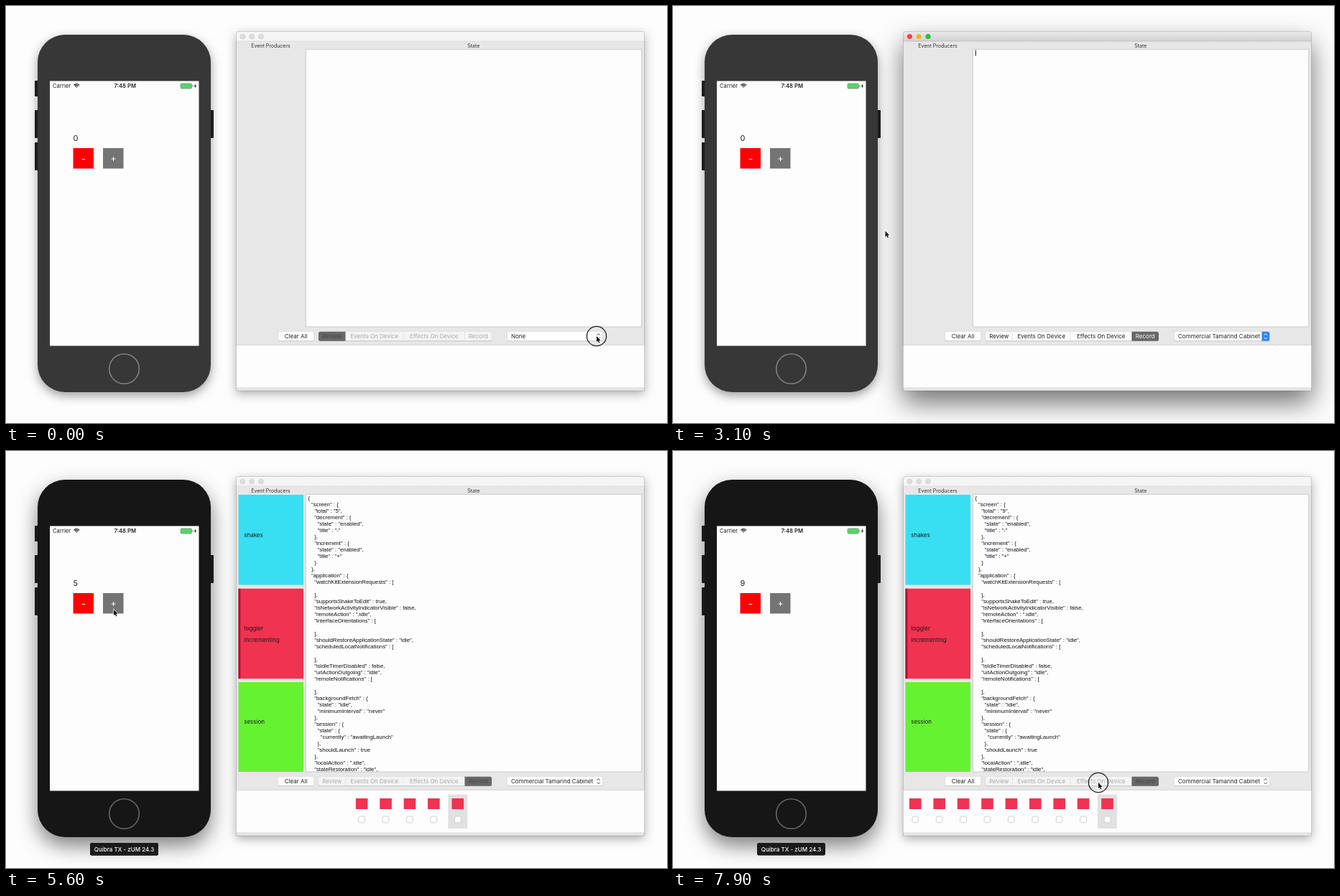
Write an HTML page with a canvas that moves like this. It is 920 px wide and 581 px high and loops after 8 s.

```html
<!DOCTYPE html>
<html lang="en">
<head>
<meta charset="utf-8">
<style>
html, body { margin: 0; width: 920px; height: 581px; overflow: hidden; background: #fdfdfd; }
canvas { display: block; }
</style>
</head>
<body>
<canvas id="stage" width="920" height="581"></canvas>
<script>
const c = document.getElementById('stage').getContext('2d');
const LOOP = 8000;
const UI = 'Inter, Roboto, sans-serif';
const CODE = '7.75px "Liberation Sans", Arial, sans-serif';
const DEVICE = 'Commercial Tamarind Cabinet';
const RED = '#ef3350';

// Times of each counted tap, and [from, to] spans when the button is held
const taps = [4310, 4640, 4950, 5270, 5560, 5740, 5920, 6100, 6250];
const presses = [[0, 190], [950, 1080], [2180, 2380], [3800, 3960], [7780, LOOP],
  [4130, 4290], ...taps.slice(1).map(t => [t - 85, t - 5])];
// Pointer stops: time, x, y
const route = [[0, 822, 460], [250, 822, 460], [600, 815, 467], [1200, 815, 467],
  [1950, 657, 467], [2800, 657, 467], [3100, 295.5, 313.5], [3650, 150, 221],
  [6700, 150, 221], [7600, 592, 462], [LOOP, 592, 462]];

const stateText = total => `{
  "screen" : {
    "total" : "${total}",
    "decrement" : {
      "state" : "enabled",
      "title" : "-"
    },
    "increment" : {
      "state" : "enabled",
      "title" : "+"
    }
  },
  "application" : {
    "watchKitExtensionRequests" : [

    ],
    "supportsShakeToEdit" : true,
    "isNetworkActivityIndicatorVisible" : false,
    "remoteAction" : ".idle",
    "interfaceOrientations" : [

    ],
    "shouldRestoreApplicationState" : "idle",
    "scheduledLocalNotifications" : [

    ],
    "isIdleTimerDisabled" : false,
    "urlActionOutgoing" : "idle",
    "remoteNotifications" : [

    ],
    "backgroundFetch" : {
      "state" : "idle",
      "minimumInterval" : "never"
    },
    "session" : {
      "state" : {
        "currently" : "awaitingLaunch"
      },
      "shouldLaunch" : true
    },
    "localAction" : ".idle",
    "stateRestoration" : "idle",`.split('\n');

function box(x, y, w, h, fill, r = 0, stroke) {
  c.beginPath();
  c.roundRect(x, y, w, h, r);
  if (fill) { c.fillStyle = fill; c.fill(); }
  if (stroke) { c.strokeStyle = stroke; c.lineWidth = 1; c.stroke(); }
}

function circle(x, y, r, fill, stroke, width = 1) {
  c.beginPath();
  c.arc(x, y, r, 0, 7);
  if (fill) { c.fillStyle = fill; c.fill(); }
  if (stroke) { c.strokeStyle = stroke; c.lineWidth = width; c.stroke(); }
}

function line(x1, y1, x2, y2, color, width = 1) {
  c.beginPath();
  c.moveTo(x1, y1);
  c.lineTo(x2, y2);
  c.strokeStyle = color;
  c.lineWidth = width;
  c.stroke();
}

function shape(points, fill, stroke) {
  c.beginPath();
  points.forEach(([x, y]) => c.lineTo(x, y));
  c.closePath();
  if (stroke) { c.strokeStyle = stroke; c.lineWidth = 1.4; c.stroke(); }
  c.fillStyle = fill;
  c.fill();
}

function text(s, x, y, { size = 8, color = '#222', align = 'left', weight = 400, font } = {}) {
  c.font = font || `${weight} ${size}px ${UI}`;
  c.textAlign = align;
  c.textBaseline = 'alphabetic';
  c.fillStyle = color;
  c.fillText(s, x, y + size * 0.36);
}

function shadowed(blur, dy, alpha, draw) {
  c.save();
  c.shadowColor = `rgba(0,0,0,${alpha})`;
  c.shadowBlur = blur;
  c.shadowOffsetY = dy;
  draw();
  c.restore();
}

function chevrons(x, y, color) {
  c.strokeStyle = color;
  c.lineWidth = 1;
  c.beginPath();
  for (const d of [-1, 1]) {
    c.moveTo(x - 2.2, y + d * 1.5);
    c.lineTo(x, y + d * 3.7);
    c.lineTo(x + 2.2, y + d * 1.5);
  }
  c.stroke();
}

function phone(active, hovered, total) {
  const body = active ? '#161616' : '#373737';
  for (const [y, h] of [[104, 22], [145, 39], [190, 39]]) box(40, y, 6, h, '#222', 1);
  box(283, 145, 6, 39, '#222', 1);
  shadowed(active ? 28 : 14, active ? 12 : 5, active ? 0.5 : 0.38,
    () => box(44, 40, 241, 498, body, 38));
  box(61, 104.5, 207.5, 369, '#fdfdfd');
  circle(164.5, 505.5, 20.8, null, active ? '#666' : '#808080', 1.6);

  text('Carrier', 65, 111.5, { size: 7.7 });
  text('7:48 PM', 165.7, 111.5, { size: 7.7, align: 'center', weight: 600 });
  c.strokeStyle = '#222';
  c.lineWidth = 1.2;
  for (const r of [1.2, 3.3, 5.4]) {
    c.beginPath();
    c.arc(98.3, 114, r, -Math.PI * 0.76, -Math.PI * 0.24);
    c.stroke();
  }
  box(243, 108, 15.5, 7, '#4cd964', 1.5, '#8d9a8f');
  box(259.5, 110, 1, 3, '#8d9a8f');
  shape([[264.2, 108], [261.8, 112], [263.2, 112], [262.6, 115], [265, 111], [263.6, 111]], '#222');

  text(total, 93.6, 184, { size: 11 });
  box(93.5, 198, 28.5, 28.5, '#fe0000');
  box(135, 198, 28.5, 28.5, '#747474');
  line(105.7, 213.5, 110.3, 213.5, '#fff');
  line(146.6, 213, 152.4, 213, '#fff');
  line(149.5, 210, 149.5, 216, '#fff');

  if (hovered) {
    box(117, 546, 95, 17.5, '#1a1a1a', 2.5);
    text('Quibra TX - zUM 24.3', 164.5, 555, { color: '#fff', align: 'center', weight: 500 });
  }
}

function toolbar(active, mode, device) {
  shadowed(1, 0.6, 0.3, () => {
    box(379, 454, 49.5, 12.5, '#fff', 2.5);
    box(435, 454, 241, 12.5, active ? '#fbfbfb' : '#f4f4f4', 2.5);
    box(698, 454, 132, 12.5, '#fff', 2.5);
  });
  text('Clear All', 403.5, 460.3, { align: 'center' });
  [['Review', 435, 472.5], ['Events On Device', 472.5, 553], ['Effects On Device', 553, 638.5],
    ['Record', 638.5, 676]].forEach(([name, from, to], i) => {
    const on = i === mode;
    if (on) box(from, 453.7, to - from, 13, '#676767', i ? [0, 2.5, 2.5, 0] : [2.5, 0, 0, 2.5]);
    else if (i < 3) line(to, 454, to, 466.5, '#dedede', 0.7);
    const color = on ? (active ? '#fff' : '#484848') : (active ? '#222' : '#a9a9a9');
    text(name, (from + to) / 2, 460.3, { align: 'center', color });
  });
  text(device, 703, 460.3);
  if (active) box(819.5, 453.7, 10.8, 13, '#2f86f6', [0, 2.5, 2.5, 0]);
  chevrons(824.7, 460.2, active ? '#fff' : '#444');
}

function panel(y, color, labels, labelY) {
  box(323.5, y, 90.5, 125.5, color);
  labels.forEach((s, i) => text(s, 331.2, labelY + i * 16.5, { color: '#1c1c1c' }));
}

function timeline(t, total) {
  const age = t - taps[total - 1];
  const last = 604.5 + 33.4 * Math.max(0, 1 - age / 150) * (total > 1);
  for (let i = 0; i < total; i++) {
    const x = last - 33.4 * (total - 1 - i);
    const selected = i === total - 1;
    if (selected) box(x - 13.5, 478.5, 27, 47.5, '#e1e1e1');
    box(x - 8.3, 484, 16.6, 15, RED);
    box(x - 4.4, 509, 8.8, 8.8, '#fff', 2, '#cfcfcf');
  }
}

function desktopWindow(t, active, mode, device, total) {
  shadowed(active ? 36 : 14, active ? 17 : 4, active ? 0.55 : 0.33,
    () => box(320.5, 35.5, 568, 500.5, '#e7e7e7', [3, 3, 0, 0]));
  const bar = c.createLinearGradient(0, 36, 0, 49);
  bar.addColorStop(0, active ? '#e9e9e9' : '#f6f6f6');
  bar.addColorStop(1, active ? '#d2d2d2' : '#f4f4f4');
  box(320.5, 35.5, 568, 13.5, bar, [3, 3, 0, 0]);
  line(320.5, 49, 888.5, 49, active ? '#bcbcbc' : '#dadada', 0.8);
  const lights = active ? ['#fc4148', '#fdb124', '#28c231'] : Array(3).fill('#dcdcdc');
  lights.forEach((fill, i) => circle(329.4 + 12.8 * i, 42.5, 3.6, fill, active ? null : '#cfcfcf', 0.6));

  const head = { size: 7, color: '#333', align: 'center' };
  text('Event Producers', 368.5, 55.5, head);
  text('State', 650.8, 55.5, head);
  box(417.3, 60.3, 467.4, 386.7, '#fdfdfd', 0, '#cbcbcb');
  box(320.5, 472.5, 568, 59.5, '#fdfdfd');
  line(320.5, 472.3, 888.5, 472.3, '#cfcfcf', 0.8);
  line(320.5, 532, 888.5, 532, '#d4d4d4', 0.8);
  box(320.5, 35.5, 568, 500.5, null, [3, 3, 0, 0], 'rgba(0,0,0,.14)');

  if (total) {
    c.save();
    c.beginPath();
    c.rect(321, 61, 563, 386);
    c.clip();
    panel(61, '#38dff2', ['shakes'], 117);
    panel(191.7, RED, ['toggler', 'incrementing'], 247);
    box(323.5, 191.7, 2.8, 125.5, '#a81436');
    panel(322, '#65f230', ['session'], 377.5);
    stateText(total).forEach((s, i) => text(s, 420.6, 65 + 9 * i, { font: CODE, color: '#111' }));
    c.restore();
    timeline(t, total);
  } else if (active && (t - 300) % 1130 < 565) {
    line(421.3, 61.5, 421.3, 69.5, '#111');
  }
  toolbar(active, mode, device);
}

function menu(second) {
  shadowed(9, 3, 0.4, () => box(689.5, 452.5, 138.5, 28.5, '#f4f4f4', 3));
  if (second) box(689.5, 466.5, 138.5, 11.5, '#3b88f8');
  else box(689.5, 454.5, 138.5, 11.5, '#3b88f8');
  const ink = second ? '#222' : '#fff';
  c.beginPath();
  c.moveTo(693.5, 460.5);
  c.lineTo(695.3, 463);
  c.lineTo(698.8, 457.3);
  c.strokeStyle = ink;
  c.lineWidth = 1;
  c.stroke();
  text('None', 703, 460.3, { color: ink });
  text(DEVICE, 703, 472, { color: second ? '#fff' : '#222' });
}

function pointerAt(t) {
  const i = Math.max(1, route.findIndex(stop => stop[0] >= t));
  const [t0, x0, y0] = route[i - 1], [t1, x1, y1] = route[i];
  const u = (t - t0) / (t1 - t0);
  const k = u * u * (3 - 2 * u);
  return [x0 + (x1 - x0) * k, y0 + (y1 - y0) * k];
}

function pointer(x, y, pressed) {
  const outline = [[0, 0], [0, 8.2], [1.9, 6.5], [3.1, 9.4], [4.4, 8.8], [3.2, 6.1], [5.7, 6]];
  if (pressed) circle(x, y, 13.6, null, '#222', 1.3);
  shape(outline.map(([dx, dy]) => [x + dx, y + dy]), '#111', '#fff');
}

function draw(t) {
  const [x, y] = pointerAt(t);
  const windowActive = t >= 100 && t < 3850;
  const total = taps.filter(tap => tap <= t).length;
  c.fillStyle = '#fdfdfd';
  c.fillRect(0, 0, 920, 581);
  phone(t >= 3850, t >= 3100 && x < 289, total);
  if (t >= 3850) phoneLabel();
  desktopWindow(t, windowActive, t < 2300 ? 0 : 3, t < 1100 ? 'None' : DEVICE, total);
  if (t >= 200 && t < 1100) menu(y > 465);
  pointer(x, y, presses.some(([from, to]) => t >= from && t < to));
}

function phoneLabel() {
  box(117, 546, 95, 17.5, '#1a1a1a', 2.5);
  text('Quibra TX - zUM 24.3', 164.5, 555, { color: '#fff', align: 'center', weight: 500 });
}

const start = performance.now();
function tick() {
  draw((performance.now() - start) % LOOP);
  requestAnimationFrame(tick);
}
tick();
</script>
</body>
</html>
```
